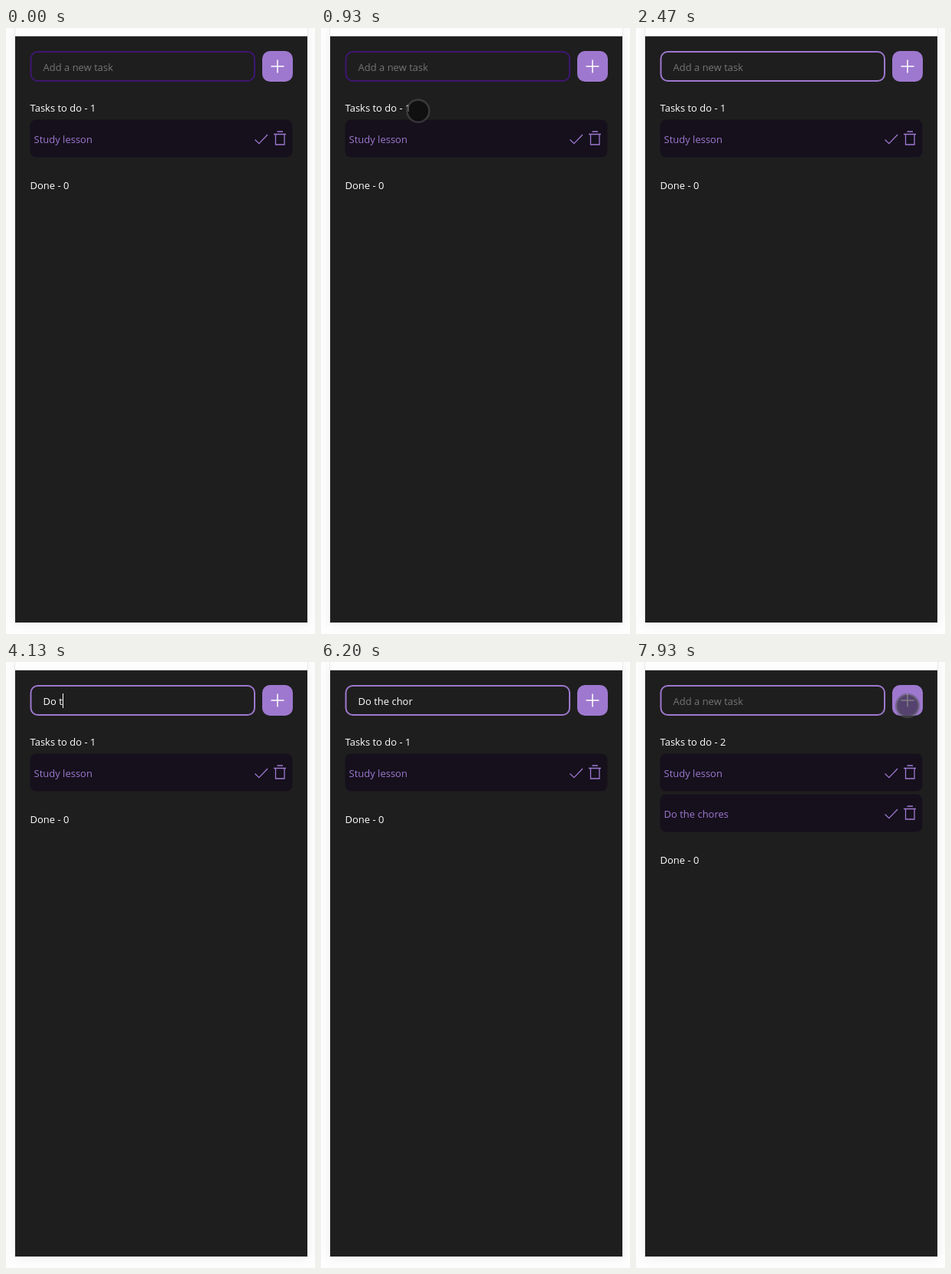
Write an HTML page that moves like this. It is 404 px wide and 790 px high and loops after 8 s.

```html
<!DOCTYPE html>
<html lang="en">
<head>
<meta charset="utf-8">
<title>Task list</title>
<style>
  html, body { margin: 0; width: 100%; height: 100%; overflow: hidden; background: #fefefe; }
  svg { display: block; width: 404px; height: 790px; }
  text { font: 13px "Open Sans", "Noto Sans", sans-serif; fill: #fff; white-space: pre; }
  .accent { fill: #9e78cf; }
  .icon { fill: none; stroke: #9e78cf; stroke-width: 1.3; }
</style>
</head>
<body>
<svg viewBox="0 0 404 790">
  <defs>
    <filter id="blur" x="-10%" y="-10%" width="120%" height="120%">
      <feGaussianBlur stdDeviation="8"/>
    </filter>
    <g id="row">
      <rect x="31.5" y="119.5" width="343" height="49" rx="8" fill="#15101c"/>
      <path class="icon" d="M325.5 145.5l5.3 5.2L342 139"/>
      <path class="icon" d="M350 138.5h16M352.5 138.5v13.5h11.500v-13.500M354.500 135h7.500"/>
    </g>
  </defs>
  <rect width="404" height="790" fill="#fefefe"/>
  <rect x="11" y="0" width="384" height="778" fill="#000" opacity=".06" filter="url(#blur)"/>
  <rect x="11" y="-2" width="384" height="778" fill="#e9e9e9"/>
  <rect x="12" y="0" width="382" height="10" fill="#fdfdfd"/>
  <rect x="12" y="10" width="382" height="1" fill="#ccc"/>
  <rect x="12" y="11" width="382" height="764" fill="#1e1e1e"/>

  <rect id="field" x="32.5" y="31" width="292.500" height="38" rx="9" fill="none" stroke-width="2"/>
  <text id="entry" x="48.500" y="56"></text>
  <rect id="caret" y="41" width="1" height="19" fill="#fff"/>
  <rect x="335" y="30" width="40" height="40" rx="10" fill="#9e78cf"/>
  <path d="M346.500 50h17M355 41.500v17" stroke="#fff" stroke-width="1.5"/>

  <text id="todo" x="31.500" y="109"></text>
  <use href="#row"/>
  <text class="accent" x="36.500" y="150">Study lesson</text>
  <g id="added">
    <use href="#row" y="53"/>
    <text class="accent" x="36.500" y="203">Do the chores</text>
  </g>
  <text id="done" x="31.500">Done - 0</text>
  <circle id="touch"/>
</svg>
<script>
const LOOP = 8000, FOCUS = 1940, ADD = 7800;
const TASK = "Do the chores";
const KEYS = [3600, 3800, 3930, 4130, 4330, 4400, 4530, 5130, 5330, 5530, 5670, 6270, 6600];
const DIM = [62, 22, 113], BRIGHT = [158, 120, 207];

const el = {};
for (const id of ["field", "entry", "caret", "todo", "added", "done", "touch"])
  el[id] = document.getElementById(id);

const set = (node, attrs) => {
  for (const name in attrs) node.setAttribute(name, attrs[name]);
};
const show = (node, on) => set(node, { visibility: on ? "visible" : "hidden" });
const unit = (t, from, to) => Math.min(1, Math.max(0, (t - from) / (to - from)));
const mix = (a, b, p) => a + (b - a) * p;
const easeOut = (p, power) => 1 - Math.pow(1 - p, power);

// Touch pointer position, or null while it is away.
function pointer(t) {
  if (t >= 130 && t < 2270) {
    const x = mix(396, 127, easeOut(unit(t, 130, 930), 2));
    const y = mix(745, 59, easeOut(unit(t, 130, 1330), 2.4));
    return [x, y + 4 * unit(t, 1330, 1470)];
  }
  if (t >= 7070) {
    const p = easeOut(unit(t, 7070, 7400), 1.45);
    return [mix(414, 355, p), mix(59, 57, p)];
  }
  return null;
}

function drawPointer(t) {
  const at = pointer(t);
  show(el.touch, at);
  if (!at) return;
  const pressed = t >= 7600 || (t >= 2000 && t < 2270);
  set(el.touch, {
    cx: at[0], cy: at[1],
    r: pressed ? 14.2 : 14.5,
    fill: pressed ? "rgba(25,22,32,.55)" : "rgba(0,0,0,.45)",
    stroke: pressed ? "rgba(90,88,96,.5)" : "rgba(80,80,80,.6)",
    "stroke-width": pressed ? 4 : 2.6
  });
}

function drawEntry(t) {
  const typed = KEYS.filter(k => k <= t);
  const value = t < ADD ? TASK.slice(0, typed.length) : "";
  el.entry.textContent = value || "Add a new task";
  el.entry.style.fill = value ? "#fff" : "#757575";

  const since = t - (typed.length ? typed[typed.length - 1] : FOCUS);
  const lit = t >= 2000 && t < ADD && Math.floor(since / 530) % 2 === 0;
  show(el.caret, lit);
  const width = value ? el.entry.getComputedTextLength() : 0;
  set(el.caret, { x: Math.round(48.5 + width) });

  const glow = unit(t, FOCUS, 2200);
  set(el.field, { stroke: `rgb(${DIM.map((c, i) => Math.round(mix(c, BRIGHT[i], glow)))})` });
}

function draw(time) {
  const t = Math.round(Math.floor((time + 4) * 0.015) / 0.15) * 10;
  const two = t >= ADD;
  drawEntry(t);
  el.todo.textContent = "Tasks to do - " + (two ? 2 : 1);
  show(el.added, two);
  set(el.done, { y: two ? 263 : 210 });
  drawPointer(t);
}

const start = performance.now();
function tick() {
  draw((performance.now() - start) % LOOP);
  requestAnimationFrame(tick);
}
tick();
</script>
</body>
</html>
```
